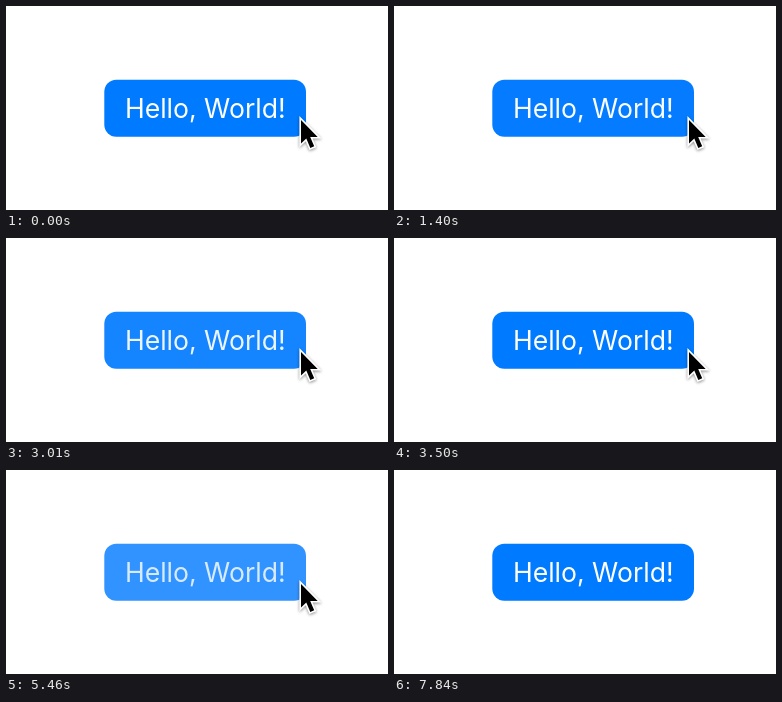
Animation, 382 px wide and 204 px high, one loop 8.12 s. Source, as an HTML page:

```html
<!DOCTYPE html>
<html lang="en">
<head>
<meta charset="utf-8">
<title>Button press</title>
<style>
  html, body { margin: 0; width: 100%; height: 100%; overflow: hidden; background: #fff; }
  svg { display: block; width: 382px; height: 204px; }
  text { font: 26.6px Inter, "Liberation Sans", sans-serif; fill: #fff; text-anchor: middle; }
  #cursor { filter: drop-shadow(0 1.5px 1.5px rgba(0, 0, 0, .45)); }
</style>
</head>
<body>
<svg viewBox="0 0 382 204">
  <rect id="box" x="98.3" y="73.8" width="201.7" height="57" rx="12" fill="#007aff"/>
  <text id="label" x="199.3" y="112.1">Hello, World!</text>
  <g id="cursor">
    <path d="M1 2.4V26L6.3 21 10.3 30.4 14.2 28.8 10.2 19.4H17.7Z"
          stroke="#fff" stroke-width="3.2" paint-order="stroke"/>
  </g>
</svg>
<script>
const LOOP = 8120, STEP = 70;
const box = document.getElementById('box');
const label = document.getElementById('label');
const cursor = document.getElementById('cursor');

// [start in ms, change]: 1 presses the button, -1 releases it
const presses = [
  [100, 1], [1030, -1],
  [2330, 1], [2800, -1],
  [3510, 1], [4010, -1],
  [5230, 1], [6980, -1]
];

// critically damped spring with a response of 0.55 s
function spring(ms) {
  if (ms <= 0) return 0;
  const x = ms / 1000 * 2 * Math.PI / 0.55;
  return 1 - (1 + x) * Math.exp(-x);
}

function ease(t, from, to) {
  const p = Math.min(1, Math.max(0, (t - from) / (to - from)));
  return p * p * (3 - 2 * p);
}

function draw(t) {
  const pressed = presses.reduce((sum, [at, d]) => sum + d * spring(t - at), 0);
  // both layers fade on their own, so the label takes on some blue
  const alpha = 1 - 0.26 * pressed;
  box.setAttribute('opacity', alpha);
  label.setAttribute('opacity', alpha);

  const nudge = 2 * (ease(t, 0, 350) - ease(t, 1000, 1400));
  const leave = ease(t, 7100, 7700);
  cursor.setAttribute('transform',
    `translate(${294 + nudge - 14 * leave} ${111.5 + nudge + 105 * leave})`);
}

function tick(now) {
  draw(Math.floor(now % LOOP / STEP) * STEP);
  requestAnimationFrame(tick);
}
draw(0);
requestAnimationFrame(tick);
</script>
</body>
</html>
```
